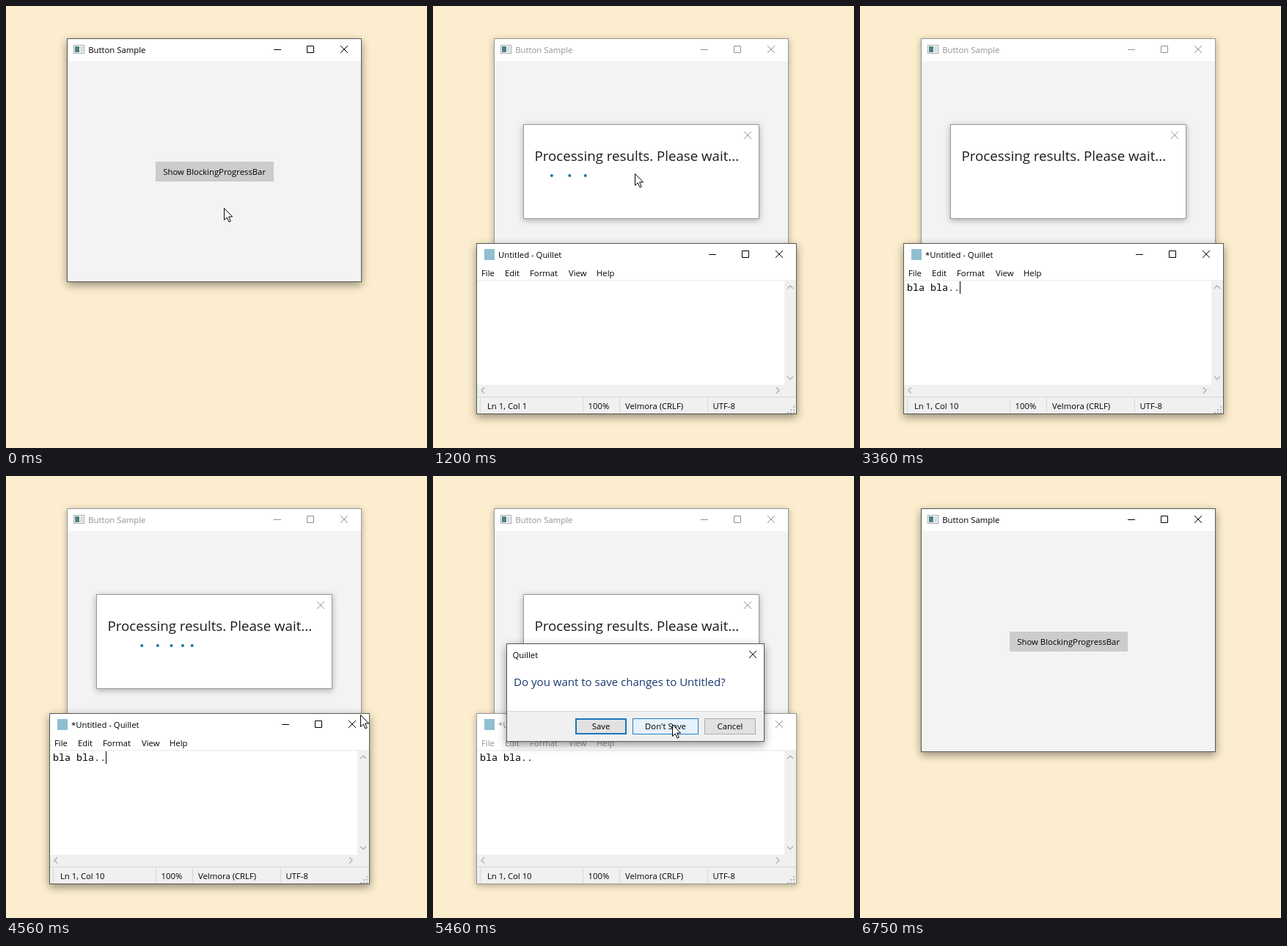
Write an HTML page that moves like this. It is 574 px wide and 602 px high and loops after 6.78 s.

```html
<!DOCTYPE html>
<html lang="en">
<head>
<meta charset="utf-8">
<title>Blocking progress bar</title>
<style>
html, body { margin: 0; width: 100%; height: 100%; overflow: hidden; background: #fbedcd; }
svg { display: block; width: 574px; height: 602px; }
text { font: 11.3px "Open Sans", "Noto Sans", sans-serif; fill: currentColor; white-space: pre; }
.line { fill: none; stroke: currentColor; }
.frame { fill: #fff; stroke: #9a9a9a; filter: drop-shadow(0 2px 4px rgba(0,0,0,.3)); }
.win { color: #929292; }
.win.active { color: #000; }
.active > .frame { stroke: #5a5a55; filter: drop-shadow(0 4px 6px rgba(0,0,0,.42)); }
.black { color: #000; }
.mid { text-anchor: middle; }
.grey { fill: #f0f0f0; }
.rule { fill: none; stroke: #d7d7d7; }
#busy { color: #1b1b1b; }
#busy text { font-size: 18.7px; }
#dots circle { fill: #1976a8; }
#show rect { fill: #ccc; stroke: #bdbdbd; stroke-dasharray: 2 1; }
#show.hover rect { stroke: #7a7a7a; stroke-dasharray: none; }
#show.pressed rect { fill: #999; stroke: #999; }
#typed { font: 13.33px "Noto Sans Mono", "DejaVu Sans Mono", monospace; }
#ask .message { font-size: 15.05px; fill: #17396f; }
.button { fill: #e1e1e1; stroke: #adadad; }
.button.default { stroke: #1b76bb; stroke-width: 2; }
.button.hot { fill: #e5f1fb; stroke: #2380c6; }
</style>
</head>
<body>
<svg viewBox="0 0 574 602">
  <g id="main" class="win">
    <rect class="frame" x="83.5" y="44.5" width="401" height="331"/>
    <rect x="84" y="75" width="400" height="300" fill="#f3f3f3"/>
    <rect x="92.5" y="53.5" width="14" height="11" fill="#fff" stroke="#a3a8ab"/>
    <rect x="94" y="55" width="6" height="8" fill="#4d7f80"/>
    <rect x="101" y="55" width="4" height="8" fill="#cfdfe2"/>
    <text x="112.3" y="64">Button Sample</text>
    <path class="line" d="M365 59.5h10M410.5 54.5h9v9h-9zM456 54l10 10m0-10l-10 10"/>
    <g id="show" class="black">
      <rect x="204.5" y="212.5" width="160" height="26"/>
      <text class="mid" x="284.2" y="230">Show BlockingProgressBar</text>
    </g>
  </g>

  <g id="busy">
    <rect class="frame" x="123.5" y="161.5" width="321" height="128"/>
    <path class="line" style="stroke:#999" d="M424 171l10 10m0-10l-10 10"/>
    <text x="138.5" y="211">Processing results. Please wait...</text>
    <g id="dots"></g>
  </g>

  <g id="editor" class="win">
    <rect class="frame" x="59.5" y="323.5" width="436" height="232"/>
    <rect x="70" y="331" width="14" height="15" fill="#8fbfd0"/>
    <text id="name" x="89" y="343"></text>
    <rect id="closeHot" x="450" y="324" width="45" height="29" fill="#e81123"/>
    <path class="line" d="M376 338.5h10M421.5 333.5h9v9h-9z"/>
    <path id="closeX" class="line" d="M467 333l10 10m0-10l-10 10"/>
    <text x="66" y="368">File</text>
    <text x="98" y="368">Edit</text>
    <text x="132" y="368">Format</text>
    <text x="185" y="368">View</text>
    <text x="223" y="368">Help</text>
    <path class="grey" d="M60 373h435v182H60v-39h419V374.500H60z"/>
    <path class="rule" d="M60 532.500h435M64.500 534v20M204.500 534v20M254.500 534v20M374.500 534v20"/>
    <path class="line" style="stroke:#b4b4b4;stroke-width:1.5"
      d="M483 385l4-4 4 4M483 504.500l4 4 4-4M70 519.500l-4 4 4 4M468 519.500l4 4-4 4"/>
    <path d="M491 545h2v2h-2zm0 4h2v2h-2zm0 4h2v2h-2zm-4-4h2v2h-2zm0 4h2v2h-2zm-4 0h2v2h-2z" fill="#b9b9b9"/>
    <g class="black">
      <text id="typed" x="64" y="388"></text>
      <path id="caret" class="line" d="M.5 375v17"/>
      <text id="column" x="74" y="549"></text>
      <text x="211.500" y="549">100%</text>
      <text x="262" y="549">Velmora (CRLF)</text>
      <text x="381.500" y="549">UTF-8</text>
    </g>
  </g>

  <g id="ask" class="win active">
    <rect class="frame" x="100.500" y="228.500" width="351" height="133"/>
    <rect class="grey" x="101" y="320" width="350" height="41"/>
    <path class="rule" d="M101 320.500h350"/>
    <text x="108.500" y="248">Quillet</text>
    <path class="line" d="M431 238l10 10m0-10l-10 10"/>
    <text class="message" x="110" y="286">Do you want to save changes to Untitled?</text>
    <rect class="button default" x="195" y="331" width="68" height="20"/>
    <rect id="dontSave" class="button" x="272.500" y="330.500" width="89" height="21"/>
    <rect class="button" x="370.500" y="330.500" width="69" height="21"/>
    <text class="mid" x="229" y="345">Save</text>
    <text class="mid" x="317" y="345">Don't Save</text>
    <text class="mid" x="405" y="345">Cancel</text>
  </g>

  <path id="pointer" d="M.5 .5v16l3.700-3.500 2.800 6 2.300-1-2.700-6h5z" fill="#fff" stroke="#000"/>
</svg>
<script>
const LOOP = 6780;
const OPEN = 540, DONE = 6030, ASK = 4770, DISCARD = 5610;
const FIRST_KEY = 1980, KEY_GAP = 140, PHRASE = 'bla bla..';
const $ = id => document.getElementById(id);
const clamp = v => Math.max(0, Math.min(1, v));
const within = (t, a, b) => t >= a && t < b;
const linear = p => p;
const smooth = p => p * p * (3 - 2 * p);

// Keys are [time, ...values]
const pointerPath = [
  [0, 297, 275], [60, 297, 275], [420, 275, 228], [3600, 275, 228],
  [4080, 508, 340], [4300, 508, 336], [4560, 483, 325], [4650, 478, 335],
  [4890, 478, 335], [5370, 326, 338], [6210, 326, 338], [6660, 300, 557]
];
const dotClock = [[600, 0], [2040, 6.6], [3360, 20.6], [3905, 23.5], [3905, 0], [4560, 5.7], [6200, 20]];

function track(keys, t, ease = linear) {
  const i = keys.findIndex(k => k[0] > t);
  if (i < 0) return keys[keys.length - 1].slice(1);
  if (i === 0) return keys[0].slice(1);
  const a = keys[i - 1], b = keys[i], p = ease((t - a[0]) / (b[0] - a[0]));
  return a.slice(1).map((v, j) => v + (b[j + 1] - v) * p);
}

// Slow down, glide through the middle, speed up again
function dotX(s) {
  if (s > 7.9) return 560 - dotX(15.8 - s);
  const r = 5.4 - s;
  return 250 - 12 * r - (r > 0 ? 1.5 * r * r : 0);
}

function zoom(el, scale, cx, cy) {
  el.setAttribute('transform', `translate(${cx} ${cy}) scale(${scale}) translate(${-cx} ${-cy})`);
}

function showWindow(id, t, start, end, cx, cy) {
  const opened = 1 - (1 - clamp((t - start) / 180)) ** 3;
  const k = opened * (1 - clamp((t - end) / 150));
  $(id).style.opacity = k;
  zoom($(id), 0.9 + 0.1 * k, cx, cy);
}

function show(id, on) { $(id).style.visibility = on ? 'visible' : 'hidden'; }

$('dots').innerHTML = '<circle cy="231" r="2"/>'.repeat(5);

function draw(t) {
  $('main').classList.toggle('active', !within(t, OPEN, DONE));
  const pressed = within(t, 450, 660);
  $('show').setAttribute('class', 'black' + (pressed ? ' pressed' : within(t, 330, 450) ? ' hover' : ''));
  zoom($('show'), pressed ? 0.97 : 1, 284.5, 225.5);

  showWindow('busy', t, OPEN, DONE, 284, 225.5);
  const [phase] = track(dotClock, t);
  [...$('dots').children].forEach((dot, i) => {
    const s = phase - i;
    dot.setAttribute('cx', dotX(s));
    dot.setAttribute('opacity', within(s, 0, 15.8) ? 1 : 0);
  });

  showWindow('editor', t, OPEN, DISCARD + 30, 277.5, 439.5);
  $('editor').classList.toggle('active', t < ASK);
  const count = Math.max(0, Math.min(PHRASE.length, Math.floor((t - FIRST_KEY) / KEY_GAP) + 1));
  $('name').textContent = (count ? '*' : '') + 'Untitled - Quillet';
  $('typed').textContent = PHRASE.slice(0, count);
  $('column').textContent = 'Ln 1, Col ' + (count + 1);
  const lastKey = count ? FIRST_KEY + (count - 1) * KEY_GAP : OPEN;
  $('caret').setAttribute('transform', `translate(${64 + 8 * count} 0)`);
  $('caret').setAttribute('opacity', t < ASK && (t - lastKey) % 1060 < 530 ? 1 : 0);
  const hot = within(t, 4590, ASK);
  show('closeHot', hot);
  $('closeX').style.stroke = hot ? '#fff' : '';

  showWindow('ask', t, ASK, DISCARD, 276, 295);
  $('dontSave').classList.toggle('hot', t > 5300);

  const [x, y] = track(pointerPath, t, smooth);
  $('pointer').setAttribute('transform', `translate(${x} ${y})`);
  show('pointer', !within(t, FIRST_KEY, 3600) && t < 6690);
}

function tick() {
  draw(performance.now() % LOOP);
  requestAnimationFrame(tick);
}
tick();
</script>
</body>
</html>
```
